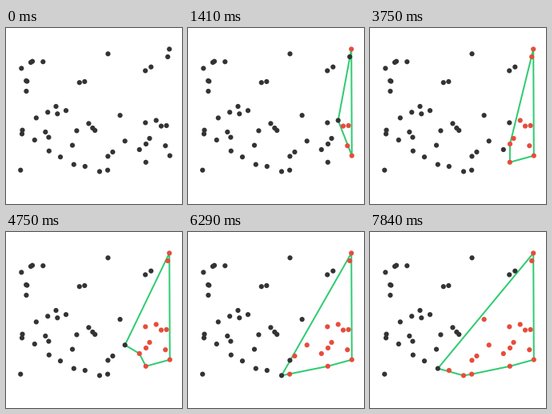
These frames come from a looping animation (220x220 px, 8 s). A matplotlib script:

```python
import math

import matplotlib.pyplot as plt
import numpy as np
from matplotlib.animation import FuncAnimation

SIZE, DPI = 220, 100
PX = 72 / DPI
LOOP, STEP = 8000, 10
DARK, RED, GREEN = "#333333", "#e74c3c", "#2ecc71"

PIVOT = (204.2, 26.4)
POINTS = [
    (202.2, 36), (181.3, 48.7), (174.2, 53.4), (127.5, 32.3), (98.3, 67),
    (91.8, 68.2), (46.3, 42.2), (33, 41.7), (31, 43), (19.3, 50.4),
    (25.2, 66), (26.3, 66.6), (25.4, 79), (62.5, 98), (52.2, 105.3),
    (64.3, 107.3), (75, 103.2), (37.8, 112.4), (20.5, 127.7), (20, 132.4),
    (49.3, 130), (53.4, 136.6), (35.8, 140), (88.4, 128.4), (103.4, 119.4),
    (108.3, 125), (111.2, 128), (142.6, 109.2), (148.7, 141.3),
    (133.4, 155), (127.4, 160.4), (83, 146.6), (53.8, 153.7), (68, 161.2),
    (84.8, 170.6), (98.8, 173), (117, 179.4), (127.1, 177.7), (18.2, 177.7),
    (187.7, 115.5), (194, 122.6), (200.6, 122), (174.3, 118.4), (179.5, 138),
    (175, 145), (166.8, 152), (174.8, 167.8), (199.3, 147.2), (204.8, 159.6),
]

# (time in ms, step of the scan shown from then on)
SCHEDULE = [
    (160, 1), (410, 2), (830, 5), (1160, 7), (1410, 9), (1750, 11),
    (1830, 12), (2160, 13), (2410, 15), (2750, 16), (2960, 17), (3290, 19),
    (3420, 20), (3750, 22), (3960, 23), (4290, 25), (4420, 26), (4750, 28),
    (4960, 29), (5290, 31), (5500, 33), (5750, 34), (5960, 36), (6290, 38),
    (6500, 39), (6840, 41), (6960, 43), (7420, 45), (7500, 46), (7840, 48),
]
TIMES = [t for t, _ in SCHEDULE]


def angle(p):
    return math.atan2(PIVOT[0] - p[0], p[1] - PIVOT[1])


def turn(a, b, c):
    return (b[0] - a[0]) * (c[1] - b[1]) - (b[1] - a[1]) * (c[0] - b[0])


def graham_scan(pts):
    """List (path, number of finished points) after every pop and push."""
    hull = [pts[0], pts[1]]
    steps = [(hull[:], 2)]
    for i, p in enumerate(pts[2:], 2):
        while True:
            top = hull.pop()
            steps.append((hull + [p], i))
            if len(hull) < 2 or turn(hull[-1], top, p) > 0:
                break
        hull += [top, p]
        steps.append((hull[:], i + 1))
    return steps


pts = [PIVOT] + sorted(POINTS, key=angle)
steps = graham_scan(pts)

fig = plt.figure(figsize=(SIZE / DPI, SIZE / DPI), dpi=DPI, facecolor="white")
ax = fig.add_axes([0, 0, 1, 1])
ax.set(xlim=(0, SIZE), ylim=(SIZE, 0))
ax.axis("off")

outline, = ax.plot([], [], color=GREEN, lw=2 * PX, solid_joinstyle="round")
dots = ax.scatter(*zip(*pts), s=(6.2 * PX) ** 2, c=[DARK] * len(pts),
                  linewidths=0, zorder=3)


def draw(frame):
    k = int(np.searchsorted(TIMES, frame * STEP, side="right"))
    path, done = steps[SCHEDULE[k - 1][1]] if k else ([], 0)
    loop = path + path[:1]
    outline.set_data([p[0] for p in loop], [p[1] for p in loop])
    dots.set_facecolor([RED] * done + [DARK] * (len(pts) - done))
    return outline, dots


anim = FuncAnimation(fig, draw, frames=LOOP // STEP, interval=STEP,
                     repeat=True, repeat_delay=0)
plt.show()
```
